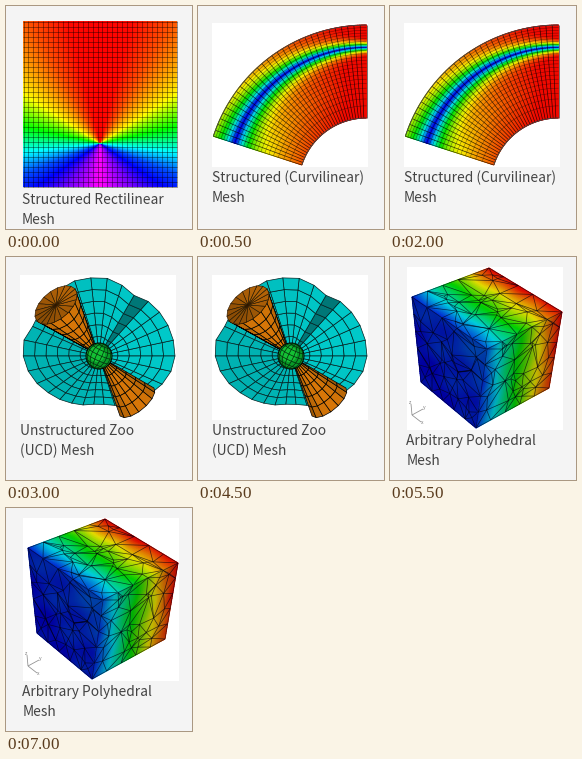
Recreate the animation shown at these times as a matplotlib script. Size 186 by 223 pixels, loop 8 s.

```python
import colorsys

import matplotlib.pyplot as plt
import numpy as np
from matplotlib.animation import ArtistAnimation
from matplotlib.collections import LineCollection, PolyCollection
from matplotlib.colors import LinearSegmentedColormap
from matplotlib.patches import Circle, Rectangle
from matplotlib.tri import Triangulation

W, H, DPI = 186, 223, 64
PX = 72 / DPI  # points per pixel
STEP = 500
FONT = "Noto Sans CJK JP"
RAINBOW = LinearSegmentedColormap.from_list(
    "rainbow", ["#0000e0", "#00e0f0", "#00e000", "#f8f000", "#f00800"])

fig = plt.figure(figsize=(W / DPI, H / DPI), dpi=DPI, facecolor="#f4f4f4")
ax = fig.add_axes([0, 0, 1, 1])
ax.axis("off")
ax.autoscale(False)


class Scene:
    """Collects the artists of one slide in drawing order."""

    def __init__(self):
        self.artists = []

    def add(self, artist):
        artist.set_zorder(len(self.artists) + 1)
        self.artists.append(artist)

    def panel(self, x0, y0, x1, y1):
        self.add(ax.add_patch(Rectangle((x0, y0), x1 - x0, y1 - y0, fc="white", lw=0)))

    def caption(self, x, y, *rows):
        for i, row in enumerate(rows):
            self.add(ax.text(x, y + 20 * i, row, family=FONT, size=13.8 * PX,
                             color="#444444", va="baseline"))

    def lines(self, paths, width=0.7, color="black", alpha=1.0):
        self.add(ax.add_collection(LineCollection(
            paths, colors=color, linewidths=width * PX, alpha=alpha), autolim=False))

    def polys(self, shapes, colors, width=0.8, edge="black"):
        self.add(ax.add_collection(PolyCollection(
            shapes, facecolors=colors, edgecolors=edge, linewidths=width * PX),
            autolim=False))

    def field(self, x, y, value):
        self.add(ax.pcolormesh(x, y, value, cmap=RAINBOW, vmin=0, vmax=1,
                               shading="gouraud"))


def shade(rgb, k):
    return tuple(min(1, c * k) for c in rgb)


def rectilinear():
    s = Scene()
    x0, y0, x1, y1 = 17, 15, 171, 181
    x, y = np.meshgrid(np.arange(x0, x1) + 0.5, np.arange(y0, y1) + 0.5)
    angle = np.degrees(np.arctan2(np.abs(x - 94), 137.5 - y))
    hue = np.interp(angle, [0, 15, 30, 56, 75, 96, 112, 143, 180],
                    [0, 2, 18, 57, 112, 178, 222, 268, 302]) / 360
    rgb = np.array([colorsys.hsv_to_rgb(h, 1, 1) for h in hue.ravel()])
    s.add(ax.imshow(rgb.reshape(hue.shape + (3,)), extent=(x0, x1, y1, y0),
                    aspect="auto", interpolation="nearest"))
    cols = np.linspace(x0 + 0.5, x1 - 0.5, 32)
    rows = np.linspace(y0 + 0.5, y1 - 0.5, 34)
    s.lines([[(c, y0), (c, y1)] for c in cols], 0.7, alpha=0.55)
    s.lines([[(x0, r), (x1, r)] for r in rows], 0.7, alpha=0.55)
    s.caption(15.5, 198, "Structured Rectilinear", "Mesh")
    return s


def curvilinear():
    s = Scene()
    s.panel(14, 17, 170, 161)
    cx, cy, inner, outer = 168.5, 180, 68, 161

    def polar(r, a):
        return cx - r * np.cos(a), cy - r * np.sin(a)

    start, end = np.radians(18), np.radians(90)
    r, a = np.meshgrid(np.linspace(inner, outer, 140), np.linspace(start, end, 90))
    u = (a - start) / (end - start)
    width = 15 - 11.5 * u ** 0.8
    top = 0.79 + 0.25 * u ** 1.2
    value = top * (1 - np.exp(-(np.abs(r - 139) / width) ** 1.25))
    value += 0.13 * np.clip((100 - r) / 32, 0, 1) * (1 - u)
    s.field(*polar(r, a), np.clip(value, 0, 1))

    arc = np.linspace(start, end, 60)
    radii = inner + (outer - inner) * np.linspace(0, 1, 24) ** 0.65
    s.lines([np.column_stack(polar(q, arc)) for q in radii], 0.5, alpha=0.5)
    s.lines([[polar(inner, t), polar(outer, t)] for t in np.linspace(start, end, 33)],
            0.7, alpha=0.75)
    s.lines([np.column_stack(polar(q, arc)) for q in (inner, outer)], 0.9, "#444444")
    s.caption(13.5, 176, "Structured (Curvilinear)", "Mesh")
    return s


def cone(s, tip, base, half, depth, capped):
    tip, base = np.array(tip, float), np.array(base, float)
    axis = (base - tip) / np.hypot(*(base - tip))
    side = np.array([-axis[1], axis[0]])

    def ring(t, phi):
        spread = half * np.cos(phi) * side + depth * np.sin(phi) * axis
        return tip + (base - tip) * t + spread * t

    orange = (0.78, 0.43, 0.03)
    sign = -1 if capped else 1
    phis = sign * np.linspace(0, np.pi, 8)
    levels = np.linspace(0.15, 1, 6)
    shapes, colors = [], []
    for i, (p, q) in enumerate(zip(phis, phis[1:])):
        for t, v in zip(levels, levels[1:]):
            shapes.append([ring(t, p), ring(t, q), ring(v, q), ring(v, p)])
            colors.append(shade(orange, 0.72 + 0.36 * np.sin(np.pi * (i + 0.5) / 7)))
    s.polys(shapes, colors, 0.7)
    if capped:
        rim = np.linspace(0, 2 * np.pi, 19)
        s.polys([[base, ring(1, p), ring(1, q)] for p, q in zip(rim, rim[1:])],
                [shade(orange, 0.8 + 0.1 * np.cos(p)) for p in rim[:-1]],
                0.6, "#2a1600")


def zoo():
    s = Scene()
    s.panel(14, 18, 170, 163)
    cx, cy = 93, 99
    knots = [0, 17, 46, 60, 82, 108, 154, 172, 197, 212, 238, 270, 310, 345, 360]
    reach = [76, 76, 74, 70, 78, 79, 72, 78, 71, 64, 55, 47, 58, 73, 76]

    def point(t, deg):
        r = t * np.interp(deg % 360, knots, reach)
        a = np.radians(deg)
        return cx + r * np.cos(a), cy - r * np.sin(a)

    spokes = np.linspace(0, 360, 31)
    rings = np.linspace(0.1, 1, 7)
    shapes, colors = [], []
    for a, b in zip(spokes, spokes[1:]):
        light = 0.6 if 46 < a < 60 else 0.95 + 0.06 * np.cos(np.radians(a - 20))
        color = shade((0, 0.78, 0.78), light)
        for t, v in zip(rings, rings[1:]):
            shapes.append([point(t, a), point(t, b), point(v, b), point(v, a)])
            colors.append(color)
    s.polys(shapes, colors, 0.7, "#022020")
    cone(s, (92, 98), (50, 48), 25, 14, True)
    cone(s, (93, 99), (131, 145), 22, 9, False)

    radius = 13
    s.add(ax.add_patch(Circle((cx, cy), radius, fc="#0a9a28", ec="black", lw=PX)))
    s.add(ax.add_patch(Circle((cx - 2, cy - 2), 8, fc="#14c034", lw=0)))
    v = np.linspace(-np.pi / 2, np.pi / 2, 20)
    tilt = np.radians(25)
    turn = np.array([[np.cos(tilt), np.sin(tilt)], [-np.sin(tilt), np.cos(tilt)]])
    grid = []
    for k in np.radians(np.arange(-60, 61, 24)):
        bow = np.column_stack([np.sin(k) * np.cos(v), np.sin(v)]) * radius
        flat = np.column_stack([np.cos(k) * np.sin(v),
                                np.sin(k) + 0.15 * np.cos(v) * np.cos(k)]) * radius
        grid += [bow @ turn + (cx, cy), flat @ turn + (cx, cy)]
    s.lines(grid, 0.7, "#032b0c")
    s.caption(13.5, 178, "Unstructured Zoo", "(UCD) Mesh")
    return s


def polyhedral():
    s = Scene()
    s.panel(17, 10, 173, 173)
    # x, y and field value at each visible corner
    left, back = (22, 40, 0.04), (99, 11, 1.0)
    right, front = (172, 55, 1.0), (97, 92, 0.1)
    low_left, low, low_right = (31, 125, 0.0), (86, 171, 0.03), (159, 131, 0.95)
    faces = [(left, back, front, right), (left, front, low_left, low),
             (front, right, low, low_right)]
    shadows = [0.08, 0.3, 0.22]
    rng = np.random.default_rng(7)
    edge = np.linspace(0, 1, 6)

    def blend(face, u, v):
        p, q, r, t = (np.array(c)[:, None] for c in face)
        return p * (1 - u) * (1 - v) + q * u * (1 - v) + r * (1 - u) * v + t * u * v

    for face, shadow in zip(faces, shadows):
        u, v = np.meshgrid(np.linspace(0, 1, 40), np.linspace(0, 1, 40))
        x, y, value = blend(face, u.ravel(), v.ravel()).reshape(3, 40, 40)
        wobble = 0.025 * np.sin(9 * u + 4 * v) * np.sin(11 * v)
        s.field(x, y, np.clip(value + wobble, 0, 1))
        outline = [face[k][:2] for k in (0, 1, 3, 2)]
        s.polys([outline], [(0, 0, 0.05, shadow)], 0, "none")

        inside = rng.uniform(0.06, 0.94, (2, 36))
        border = np.hstack([[edge, 0 * edge], [edge, 0 * edge + 1],
                            [0 * edge[1:-1], edge[1:-1]],
                            [0 * edge[1:-1] + 1, edge[1:-1]]])
        nodes = np.hstack([inside, border])
        tri = Triangulation(*nodes)
        xy = blend(face, *nodes)[:2].T
        s.lines(xy[tri.edges], 0.7, "#000010", 0.7)

    hub = (22, 158)
    s.lines([[hub, (21, 147)], [hub, (33, 152)], [hub, (31, 165)]], 0.8, "#909090")
    for x, y, name in ((19, 147, "z"), (33, 152, "y"), (31, 167, "x")):
        s.add(ax.text(x, y, name, family=FONT, size=5 * PX, color="#808080"))
    s.caption(16.5, 188, "Arbitrary Polyhedral", "Mesh")
    return s


slides = [(rectilinear(), 1), (curvilinear(), 5), (zoo(), 5), (polyhedral(), 5)]
ax.set_xlim(0, W)
ax.set_ylim(H, 0)

frames = [scene.artists for scene, count in slides for _ in range(count)]
anim = ArtistAnimation(fig, frames, interval=STEP, repeat=True, repeat_delay=0)
plt.show()
```
